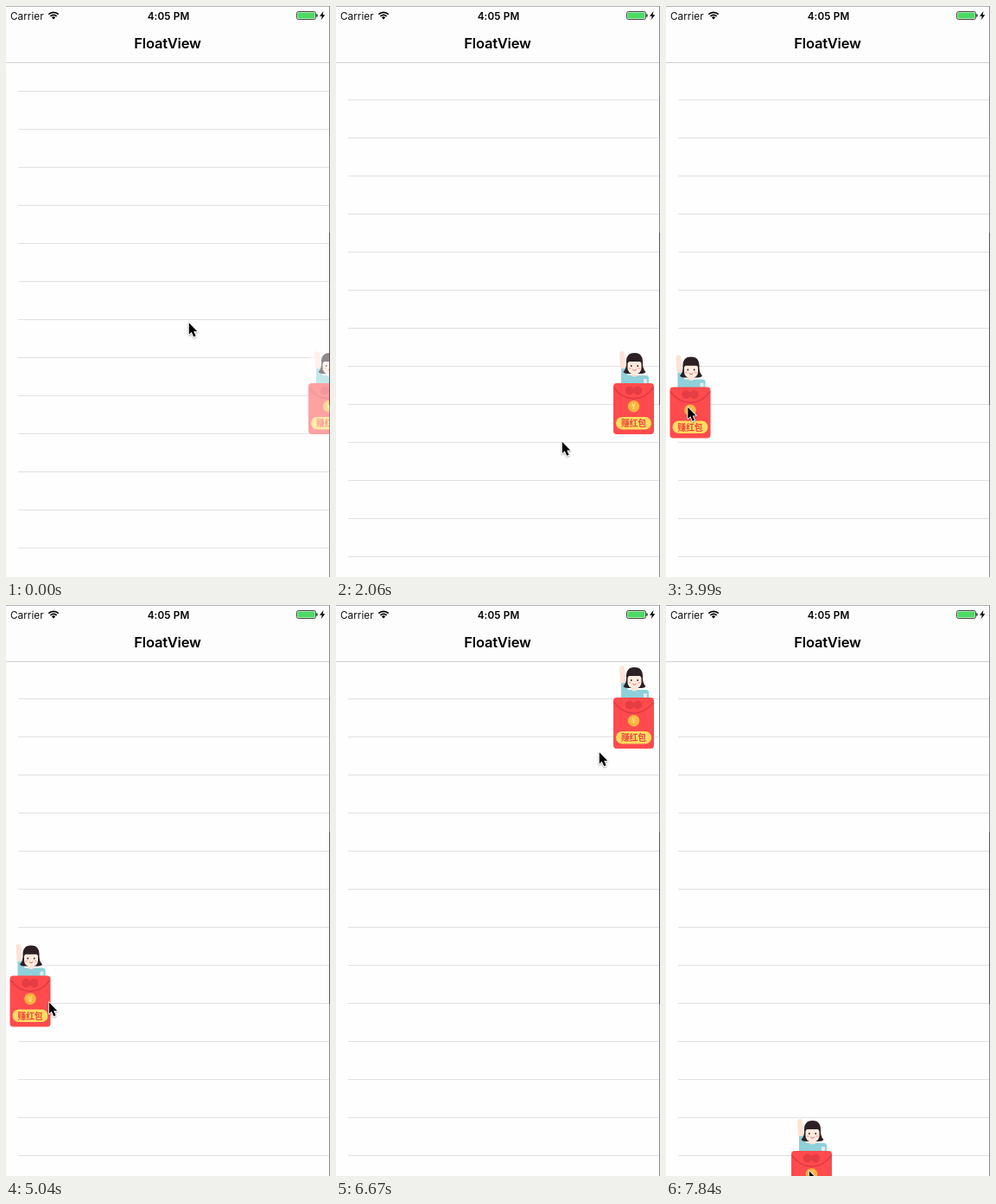
An HTML page with a canvas for the animation above (7990 ms loop, 375 by 660 pixels).

```html
<!DOCTYPE html>
<html lang="en">
<head>
<meta charset="utf-8">
<title>Float view</title>
<style>
html, body { margin: 0; width: 100%; height: 100%; overflow: hidden; background: #fefefe; }
canvas { display: block; width: 375px; height: 660px; }
</style>
</head>
<body>
<canvas id="stage" width="375" height="660"></canvas>
<script>
const ctx = document.getElementById('stage').getContext('2d');
const LOOP = 7990, STEPS = 54;
const SANS = 'Inter, "Liberation Sans", sans-serif';
const CJK = '"Noto Sans CJK SC", "Noto Sans CJK", sans-serif';

const smooth = u => u * u * (3 - 2 * u);
const easeOut = u => 1 - (1 - u) * (1 - u);
const clamp = u => Math.min(1, Math.max(0, u));

const floater = { home: [350, 436], ease: smooth, moves: [] };
const cursor = { home: [211, 366], ease: easeOut, moves: [] };

function move(actor, start, end, x, y) {
  actor.moves.push({ start, end, to: [x, y] });
}

const point = (...leg) => move(cursor, ...leg);
const dock = (...leg) => move(floater, ...leg);

// The pointer holds the float at a fixed grip and runs one step ahead of it
function drag(start, end, x, y) {
  move(floater, start, end, x, y);
  move(cursor, start, end - 1, x + 20, y + 23);
}

function place(actor, step) {
  return actor.moves.reduce((pos, { start, end, to }) => {
    const u = actor.ease(clamp((step - start) / (end - start)));
    return pos.map((v, i) => v + (to[i] - v) * u);
  }, actor.home).map(v => Math.round(v * 2) / 2);
}

// tap the half-hidden float
point(0, 3, 231, 317);
point(4, 7, 355, 469);
dock(10, 13, 321, 436);
point(11, 14, 249, 508);
// throw it to the left edge
point(14, 18, 335, 470);
drag(18, 23.18, 4.5, 436);
drag(25, 27, 4.5, 440.5);
// pull it out and let it snap back
drag(27, 30, 135, 428.5);
dock(30, 32, 4.5, 428.5);
point(31, 34, 49, 459);
point(34, 36, 24, 453);
// carry it to the top right
drag(36, 40, 163, 77);
drag(40, 42, 224, 77);
dock(42, 44, 321, 107);
point(42, 45, 304, 170);
// and down to the bottom
point(45, 47, 341, 130);
drag(47, 50, 185, 330);
drag(50, 53, 145, 631);

function rect(color, x, y, w, h) {
  ctx.fillStyle = color;
  ctx.fillRect(x, y, w, h);
}

function round(color, x, y, w, h, r) {
  ctx.fillStyle = color;
  ctx.beginPath();
  ctx.roundRect(x, y, w, h, r);
  ctx.fill();
}

function disc(color, x, y, rx, ry = rx) {
  ctx.fillStyle = color;
  ctx.beginPath();
  ctx.ellipse(x, y, rx, ry, 0, 0, Math.PI * 2);
  ctx.fill();
}

function shape(color, d) {
  ctx.fillStyle = color;
  ctx.fill(new Path2D(d));
}

function stroke(color, width, d) {
  ctx.strokeStyle = color;
  ctx.lineWidth = width;
  ctx.stroke(new Path2D(d));
}

function text(str, x, y, font, color, align = 'center', spacing = 0) {
  ctx.font = font;
  ctx.fillStyle = color;
  ctx.textAlign = align;
  ctx.letterSpacing = spacing + 'px';
  ctx.fillText(str, x, y);
  ctx.letterSpacing = '0px';
}

function drawList(scroll) {
  rect('#fefefe', 0, 0, 375, 660);
  for (let y = 98 + scroll; y < 660; y += 44) rect('#e1e1e3', 14, y, 360, 1);
}

function drawWifi() {
  const x = 55, y = 15.4;
  const fan = r => ctx.arc(x, y, r, -Math.PI * 0.75, -Math.PI * 0.25);
  ctx.strokeStyle = '#000';
  ctx.lineWidth = 1.7;
  for (const r of [5.1, 8.1]) {
    ctx.beginPath();
    fan(r);
    ctx.stroke();
  }
  ctx.fillStyle = '#000';
  ctx.beginPath();
  ctx.moveTo(x, y);
  fan(3);
  ctx.fill();
}

function drawBattery() {
  ctx.strokeStyle = '#333';
  ctx.lineWidth = 0.9;
  ctx.beginPath();
  ctx.roundRect(336.5, 6.5, 22, 9, 2);
  ctx.stroke();
  round('#4cd964', 337.5, 7.5, 20, 7, 1);
  round('#333', 359.2, 9.3, 1.5, 3.5, 0.8);
  shape('#000', 'M367.5 6 L363 11.8 H365.8 L364.6 16 L369.3 10.2 H366.5 Z');
}

function drawNav() {
  rect('#fdfdfd', 0, 0, 375, 65);
  rect('#d0d0d2', 0, 65, 374, 1);
  text('Carrier', 5, 15.5, '11.8px ' + SANS, '#111', 'left');
  drawWifi();
  text('4:05 PM', 188, 15.5, '600 11.7px ' + SANS, '#000', 'center', 0.15);
  drawBattery();
  text('FloatView', 187, 49, '600 16.5px ' + SANS, '#000', 'center', -0.2);
}

function drawGirl() {
  // sleeve, shoulders and raised arm
  shape('#8fd0da', 'M9 1 V-17 L14 -17 L17 -9 H38 Q41 -9 41 -6 V1 Z');
  shape('#fde3d6', 'M8 -17 L7 -33 Q7 -37 10 -37 Q13 -37 13 -33 L14 -17 Z');
  round('#d9eff2', 35, -5, 4, 5, 1);
  // hair with curled ends
  shape('#2d2024', 'M24.5 -35 C17 -35 15 -30 15 -25 Q15.5 -17 11.5 -13 ' +
    'Q13 -10.5 18 -11 H31 Q36 -10.5 37.5 -13 Q33.5 -17 34 -25 C34 -30 32 -35 24.5 -35 Z');
  // neck and face
  shape('#fde3d6', 'M21 -13 H28 V-9 Q24.5 -6 21 -9 Z');
  round('#feeade', 16.5, -25, 16, 14.5, [2, 2, 7, 7]);
  shape('#2d2024', 'M16 -22.5 Q17 -24.5 18 -25 H31 Q32 -24.5 33 -22.5 V-27 H16 Z');
  for (const side of [-1, 1]) {
    disc('#2d2024', 24.5 + 3.7 * side, -20, 0.9);
    disc('#f9b9ae', 24.5 + 5.3 * side, -17, 1.4, 1);
  }
  stroke('#d5544e', 0.9, 'M22.3 -16 Q24.5 -13.4 26.7 -16');
}

function drawEnvelope() {
  round('#ff4b4d', 0, 0, 47, 59, 4);
  stroke('#de3a43', 1.3, 'M0.5 5 Q10 18 23.5 18 Q37 18 46.5 5');
  disc('#e63c44', 18.8, 8.5, 5);
  disc('#e63c44', 28.2, 8.5, 5);
  disc('#fbb440', 23.5, 26.8, 6.8);
  text('¥', 23.5, 30.2, '500 9px ' + SANS, '#ffe27a');
  round('#ffdc60', 3, 39, 41, 14.5, 7.25);
  text('赚红包', 23.5, 50, 'bold 9.7px ' + CJK, '#f0433f');
}

function drawFloat([x, y], veil) {
  ctx.save();
  ctx.beginPath();
  ctx.rect(0, 0, 374, 660);
  ctx.clip();
  ctx.translate(x, y);
  drawGirl();
  drawEnvelope();
  ctx.globalAlpha = veil;
  rect('#fefefe', 0, -37, 47, 96);
  ctx.restore();
}

function drawEdges() {
  rect('#b4b4b4', 0, 0, 375, 1);
  rect('#8c8c8c', 374, 0, 1, 660);
  rect('#4690b8', 374, 104, 1, 47);
  rect('#555', 374, 262, 1, 199);
}

function drawCursor([x, y]) {
  const arrow = new Path2D('M0.8 1 V14.2 L3.8 11.4 L6.2 17 L8.6 16 L6.2 10.6 H10.2 Z');
  ctx.save();
  ctx.translate(x, y - 0.7);
  ctx.lineJoin = 'round';
  ctx.shadowColor = 'rgba(0,0,0,0.35)';
  ctx.shadowBlur = 2;
  ctx.shadowOffsetY = 1;
  ctx.strokeStyle = '#fff';
  ctx.lineWidth = 1.8;
  ctx.stroke(arrow);
  ctx.shadowColor = 'transparent';
  ctx.fillStyle = '#000';
  ctx.fill(arrow);
  ctx.restore();
}

function draw(now) {
  const step = Math.min(STEPS - 1, Math.floor((now % LOOP + 6) / (LOOP / STEPS)));
  const wake = clamp(step / 3);
  drawList(Math.round(10 * easeOut(wake)));
  drawNav();
  drawFloat(place(floater, step), 0.47 * (1 - wake));
  drawEdges();
  drawCursor(place(cursor, step));
}

const begin = performance.now();
function tick() {
  draw(performance.now() - begin);
  requestAnimationFrame(tick);
}
tick();
</script>
</body>
</html>
```
